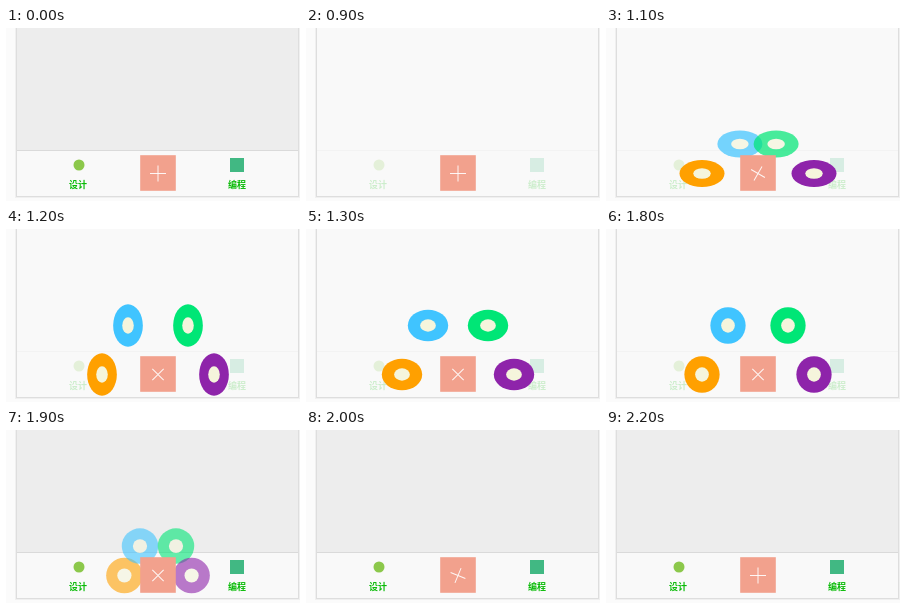
Recreate the animation shown at these times as an HTML page. Size 294 by 173 pixels, loop 2.8 s.

```html
<!DOCTYPE html>
<html lang="zh">
<head>
<meta charset="utf-8">
<title>Quick menu</title>
<style>
  html, body { margin: 0; width: 100%; height: 100%; overflow: hidden; background: #fbfbfb; }
  svg { display: block; }
  text { font: 700 9px "Noto Sans CJK SC", "Noto Sans CJK", sans-serif; fill: #09bb07; text-anchor: middle; }
</style>
</head>
<body>
<svg width="294" height="173" viewBox="0 0 294 173">
  <rect x="10.5" y="-3" width="282" height="171.5" fill="none" stroke="#f0f0f0" stroke-width="3"/>
  <rect id="panel" x="10.5" y="-2" width="282" height="170.5" fill="#ededed" stroke="#dedede"/>
  <rect x="11" y="123" width="281" height="45" fill="#f9f9f9"/>
  <g id="bar">
    <path d="M11 122.5H292" stroke="#dadada"/>
    <circle cx="73" cy="137" r="5.5" fill="#8cc84b"/>
    <rect x="224" y="130" width="14" height="14" fill="#41b883"/>
    <text x="72" y="160">设计</text>
    <text x="231" y="160">编程</text>
  </g>
  <g id="items"></g>
  <rect x="134.2" y="127.2" width="35.6" height="35.6" fill="#f2a18d"/>
  <path id="plus" d="M144 145.5H160M152 137.5V153.5" stroke="#fff" stroke-opacity=".9"/>
</svg>
<script>
const LOOP = 2800, STEP = 100, OPEN = 900, CLOSE = 1900;
const $ = id => document.getElementById(id);
const ramp = (t, start, length) => Math.min(1, Math.max(0, (t - start) / length));

const items = [
  { color: '#ffa000', x: -56, y: 0, rise: 200 },
  { color: '#40c4ff', x: -30, y: -49, rise: 280 },
  { color: '#00e676', x: 30, y: -49, rise: 280 },
  { color: '#8e24aa', x: 56, y: 0, rise: 200 }
];

for (const item of items) {
  item.node = document.createElementNS('http://www.w3.org/2000/svg', 'g');
  item.node.innerHTML = `<circle r="18" fill="${item.color}"/><circle r="7" fill="#f5f5dc"/>`;
  $('items').append(item.node);
}

// Horizontal stretch: a damped wobble that peaks 200 ms after opening
function stretch(t) {
  const s = Math.max(0, t - OPEN - 200);
  return 1 + .25 * ramp(t, OPEN, 200) * Math.exp(-s / 280) * Math.cos(Math.PI * s / 100);
}

function draw(t) {
  const open = t >= OPEN && t < CLOSE;
  $('panel').setAttribute('fill', open ? '#f9f9f9' : '#ededed');
  $('bar').setAttribute('opacity', open ? .18 : 1);

  const angle = 45 * (ramp(t, OPEN, 300) - ramp(t, CLOSE, 200));
  $('plus').setAttribute('transform', `rotate(${angle} 152 145.5)`);

  const sx = stretch(t);
  const stay = 1 - ramp(t, CLOSE - 60, 150);
  for (const { node, x, y, rise } of items) {
    const shown = ramp(t, OPEN, rise);
    const reach = shown ** 1.5 * stay;
    node.setAttribute('opacity', shown * stay);
    node.setAttribute('transform',
      `translate(${152 + x * reach} ${145.5 + y * reach}) scale(${sx} ${2 - sx})`);
  }
}

const start = performance.now();
function frame() {
  const t = (performance.now() - start) % LOOP;
  draw(Math.floor(t / STEP) * STEP);
  requestAnimationFrame(frame);
}
frame();
</script>
</body>
</html>
```
